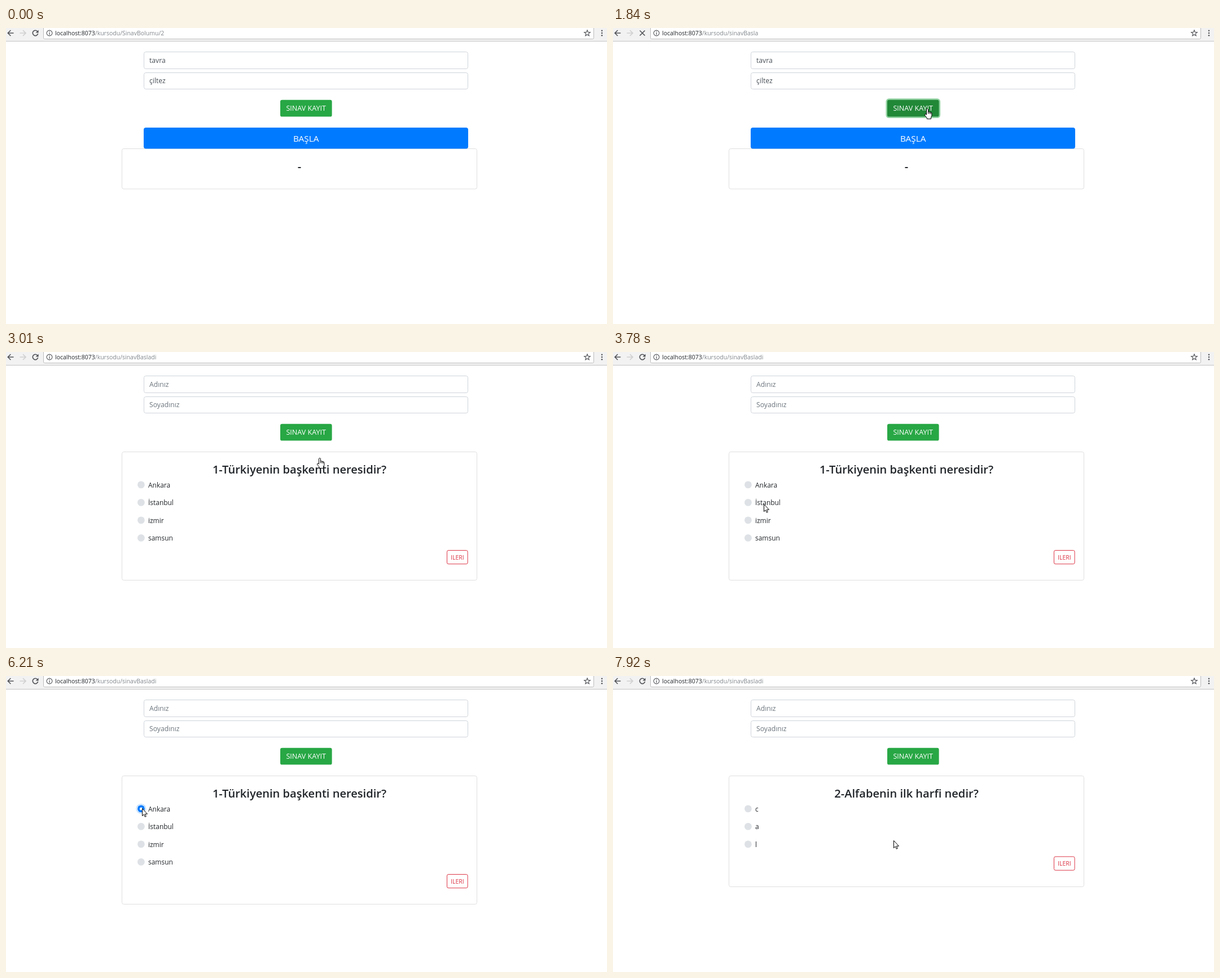
An HTML page that plays this animation: 1065 by 526 pixels, repeating every 7.99 s.

```html
<!DOCTYPE html>
<html lang="tr">
<head>
<meta charset="utf-8">
<title>Sınav</title>
<style>
  html, body { margin: 0; width: 100%; height: 100%; overflow: hidden; background: #fff; }
  svg { display: block; width: 1065px; height: 526px; }
  text { font-family: "Open Sans", "Noto Sans", sans-serif; font-size: 12.2px; fill: #212529; white-space: pre; }
  .mid { text-anchor: middle; }
  .title { font-size: 20.1px; font-weight: 600; }
  .label { font-size: 11.95px; }
  .url { font-size: 10.5px; }
  .icon { fill: none; stroke: #505256; stroke-width: 1.6; }
  .box { fill: #fff; stroke: #ced4da; }
  .card { fill: #fff; stroke: #dfdfdf; }
  .pointer { fill: #fff; stroke: #000; stroke-width: 1; stroke-linejoin: round; }
</style>
</head>
<body>
<svg id="stage" viewBox="0 0 1065 526">
  <rect width="1065" height="526" fill="#fff"/>

  <rect width="1065" height="23" fill="#f2f2f2"/>
  <path d="M0 23.5H1065" stroke="#c3c3c3"/>
  <path d="M66.5 -2V17.5Q66.5 19.5 68.5 19.5H1039.5Q1041.5 19.5 1041.5 17.5V-2Z" fill="#fff" stroke="#bcbcbc"/>
  <path class="icon" d="M13.5 9H3.5M8.3 4 3.3 9l5 5"/>
  <path class="icon" style="stroke:#d0d0d0" d="M24.5 9H35M30 4l5 5-5 5"/>
  <g id="reload">
    <path class="icon" d="M55.6 5.9A4.7 4.7 0 1 0 56.6 10"/>
    <path d="M57.6 3.4V8.4H52.6Z" fill="#505256"/>
  </g>
  <path id="stop" class="icon" d="M47.5 4.5l9 9M56.5 4.5l-9 9"/>
  <circle class="icon" cx="77" cy="9" r="4.9" style="stroke-width:1.1"/>
  <path class="icon" style="stroke-width:1.2" d="M77 8.3V12M77 5.9V7.2"/>
  <text class="url" x="87" y="13">localhost:8073<tspan fill="#80868b" id="path"></tspan></text>
  <path id="star" class="icon" style="stroke-width:1.1"/>
  <g fill="#505256"><circle cx="1056" cy="4.8" r="1.3"/><circle cx="1056" cy="9" r="1.3"/><circle cx="1056" cy="13.2" r="1.3"/></g>

  <rect class="box" x="244.5" y="42.5" width="574" height="30" rx="3.2"/>
  <rect class="box" x="244.5" y="79.5" width="574" height="29" rx="3.2"/>
  <text id="first" x="254" y="62.3"></text>
  <text id="last" x="254" y="98.3"></text>

  <rect id="saveRing" x="483.5" y="125.3" width="96.6" height="34.8" rx="5.5" fill="#93d3a2"/>
  <rect id="save" x="486" y="127.8" width="91.6" height="29.8" rx="3.2"/>
  <text class="mid" x="531.7" y="147.4" style="font-size:12.6px;fill:#fff">SINAV KAYIT</text>

  <rect id="card" class="card" x="205.5" width="629" rx="3.2"/>
  <text id="title" class="mid title" x="520"></text>

  <g id="start">
    <rect id="startRing" x="241.4" y="174.4" width="580.2" height="42.6" rx="6" fill="#80bdff"/>
    <rect id="startBox" x="244" y="177" width="575" height="37.5" rx="3.9"/>
    <text class="mid" x="531.7" y="202" style="font-size:15.35px;fill:#fff">BAŞLA</text>
  </g>

  <g id="quiz">
    <rect id="mark" x="252" y="227" width="8" height="17" fill="#3390ff"/>
    <g id="options"></g>
    <g id="check">
      <circle cx="239.4" cy="235.9" r="8.1" fill="none" stroke="#bfdeff" stroke-width="1.7"/>
      <circle id="checkDisc" cx="239.4" cy="235.9" r="6.4"/>
      <circle cx="239.4" cy="235.9" r="2.5" fill="#fff"/>
    </g>
    <g id="next">
      <rect id="nextRing" x="778.6" y="349.6" width="42.4" height="30" rx="5" fill="#eda6ac"/>
      <rect id="nextBox" x="781.5" y="352.5" width="36.6" height="24.2" rx="2.6" stroke="#dc3545"/>
      <text id="nextText" class="mid" x="799.9" y="368.8" style="font-size:10.5px">ILERI</text>
    </g>
  </g>

  <g id="cursor">
    <path id="arrow" class="pointer" d="M.5 .5V13.6L3.4 10.9 5.3 15.3 7.3 14.4 5.4 10.2H9.5Z"/>
    <g id="hand" class="pointer">
      <path d="M-1.5 1.5Q0 -.9 1.5 1.5V6Q2.8 5.2 3.8 6.4 5.2 5.8 6 7 7.7 6.8 7.9 8.5V12.6L6.5 16V18.6H-.7V16.6L-4.4 12.2Q-4.9 9.6 -2.8 9.9L-1.5 11.2Z"/>
      <path fill="none" d="M1.5 5.5V9.4M3.8 6.4V9.6M6 7V10"/>
    </g>
  </g>
</svg>

<script>
const LOOP = 7990;
const $ = id => document.getElementById(id);
const set = (id, attrs) => { for (const k in attrs) $(id).setAttribute(k, attrs[k]); };
const show = (id, on) => set(id, { display: on ? 'inline' : 'none' });
const write = (id, s) => { if ($(id).textContent !== s) $(id).textContent = s; };

// Pointer stops: time, hotspot x, y, shape (a = arrow, h = hand).
const stops = `0 0 0 -|430 580 361 a|510 568 262 a|590 560 193 h
820 560 190 h|900 559 178 h|980 558 161 a|1060 557 149 h|1140 556 144 h|1290 557 143 h
1610 557 143 h|1690 557 143 h|1840 557 143 h|1930 557 143 h|2000 557 143 h
2080 557 148 h|2160 557 160 a|2230 556 170 a|2310 556 180 h|2380 556 184 h|2450 556 187 h|2530 556 188 h
2850 556 188 h|2930 556 188 h|3010 556 188 h
3400 540 200 a|3480 470 225 a|3560 400 245 a|3640 340 258 a|3710 295 266 a|3780 267 270 a
3870 258 266 a|3950 250 260 a|4030 245 255 a|4110 241 250 a|4190 239 247 a
4260 239 246 a|4340 239 244 a|4420 239 243 a|4800 239 241 a|5200 241 243 a
5500 241 241 a|5580 241 239 a|5650 241 237 a|5730 241 235 a|6140 241 235 a|6210 241 235 a
6590 300 262 a|6670 450 318 a|6750 640 378 a|6820 805 428 a
7050 803 412 a|7130 800 390 a|7210 796 371 h|7280 795 368 h|7360 795 366 h
7600 795 366 h|7680 795 366 h|7760 795 366 h|7840 640 332 a|7920 497 292 a`
  .split(/[|\n]/).map(s => {
    const [t, x, y, shape] = s.trim().split(' ');
    return { t: +t, x, y, shape };
  });

const ramp = (t, from) => Math.min(1, Math.max(0, (t - from) / 150));
const mix = (a, b, k) => `rgb(${a.map((v, i) => Math.round(v + (b[i] - v) * k))})`;
const WHITE = [255, 255, 255], RED = [220, 53, 69];

const answers = [['Ankara', 'İstanbul', 'izmir', 'samsun'], ['c', 'a', 'l']];
const rowStep = 31.5;

function buildOptions() {
  $('options').innerHTML = answers.map((list, q) => `<g id="set${q}">` + list.map((s, i) => {
    const y = 235.9 + i * rowStep;
    return `<circle cx="239.4" cy="${y}" r="6.4" fill="#dee2e6"/>
      <text class="label" x="252" y="${y + 4.6}"><tspan${q + i ? '' : ' id="initial"'}>${s[0]}</tspan>${s.slice(1)}</text>`;
  }).join('') + '</g>').join('');
}

function buildStar() {
  const pts = Array.from({ length: 10 }, (_, i) => {
    const r = i % 2 ? 2.4 : 5.6, a = i * Math.PI / 5;
    return `${(1030 + r * Math.sin(a)).toFixed(2)} ${(9.3 - r * Math.cos(a)).toFixed(2)}`;
  });
  set('star', { d: `M${pts.join('L')}Z` });
}

function render(time) {
  const stop = stops.findLast(s => s.t <= time);
  const t = stop.t;
  const within = (a, b) => t >= a && t < b;

  const loading = within(1690, 1930) || within(2930, 3010) || within(7680, 7760);
  show('stop', loading);
  show('reload', !loading);
  write('path', '/kursodu/' + (t < 1690 ? 'SinavBolumu/2' : t < 2930 ? 'sinavBasla' : 'sinavBasladi'));

  const filled = t < 1930;
  write('first', filled ? 'tavra' : 'Adınız');
  write('last', filled ? 'çiltez' : 'Soyadınız');
  for (const id of ['first', 'last']) $(id).style.fill = filled ? '#495057' : '#6c757d';

  const saveHover = ramp(t, 980) - ramp(t, 2150);
  set('save', { fill: t === 1610 ? '#1e7e34' : mix([40, 167, 69], [33, 136, 56], saveHover) });
  show('saveRing', within(1610, 1930));

  const startHover = ramp(t, 440) - ramp(t, 940) + ramp(t, 2300);
  set('startBox', { fill: t === 2850 ? '#0062cc' : mix([0, 123, 255], [0, 105, 217], startHover) });
  show('startRing', within(2850, 3010));

  const quiz = t >= 3010, second = t >= 7760;
  show('start', !quiz);
  show('quiz', quiz);
  set('card', quiz ? { y: 177.5, height: second ? 197 : 228 } : { y: 214.5, height: 71.5 });
  set('title', { y: quiz ? 215.8 : 252.5 });
  write('title', !quiz ? '-' : second ? '2-Alfabenin ilk harfi nedir?' : '1-Türkiyenin başkenti neresidir?');
  show('set0', !second);
  show('set1', second);

  const marked = within(4800, 6140);
  show('mark', marked);
  $('initial').style.fill = marked ? '#fff' : '#212529';
  show('check', within(6140, 7760));
  set('checkDisc', { fill: t === 6140 ? '#b3d7ff' : '#007bff' });

  const nextHover = second ? 0 : ramp(t, 7190);
  set('next', { transform: `translate(0 ${second ? -rowStep : 0})` });
  set('nextBox', { fill: mix(WHITE, RED, nextHover) });
  $('nextText').style.fill = mix(RED, WHITE, nextHover);
  show('nextRing', within(7600, 7760));

  set('cursor', { transform: `translate(${stop.x} ${stop.y})` });
  show('arrow', stop.shape === 'a');
  show('hand', stop.shape === 'h');
}

function tick() {
  render(performance.now() % LOOP);
  requestAnimationFrame(tick);
}

buildOptions();
buildStar();
tick();
</script>
</body>
</html>
```
